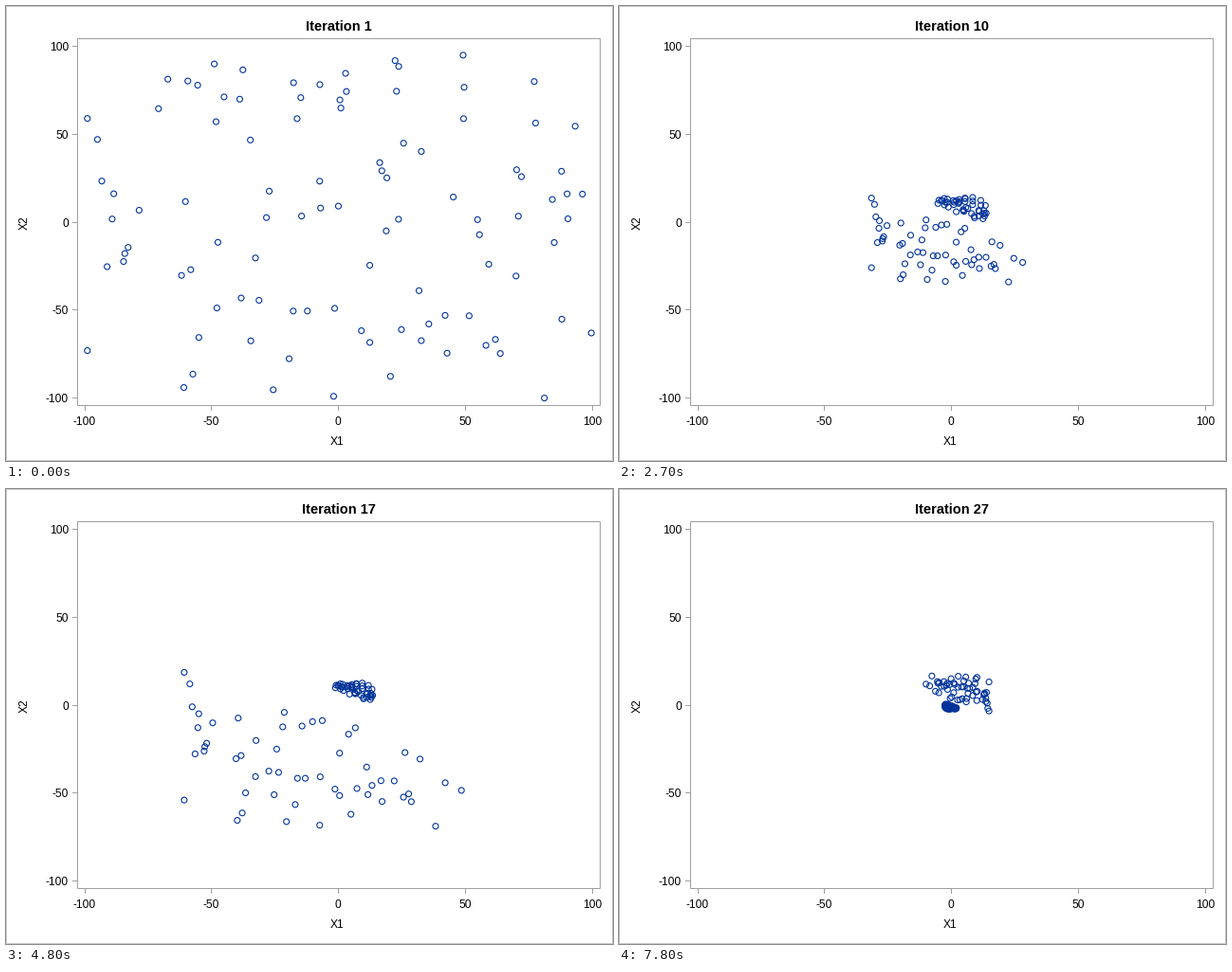
A matplotlib script that plays this animation: 640 px wide and 480 px high, repeating every 8 s.

```python
import numpy as np
import matplotlib.pyplot as plt
from matplotlib.animation import FuncAnimation
from matplotlib.patches import Rectangle

W, H, DPI = 640, 480, 100
STEP_MS, TICK_MS, LOOP_MS = 300, 100, 8000
BLUE, GREY, PALE = "#003399", "#a0a0a0", "#c8c8c8"

# Outermost particles; the others are scattered at random inside them.
RIM = np.array([(-99, 59), (-99, -73), (-61, -94), (-2, -99), (81, -100),
                (99.5, -63), (96, 16), (77, 80), (49, 95), (-49, 90)])
COUNT = 100

# Turning points of the swing: iteration -> scale of the swarm.
SWING = {1: 1, 4: -.572, 8: .42, 10: .3, 13: -.46, 15: -.317, 17: .55,
         19: -.821, 21: .55, 23: -.166, 25: .305, 27: -.125}
CLUMP = np.array([24.5, 39])


def scatter_swarm(seed=7):
    rng = np.random.default_rng(seed)
    inner = rng.uniform(-96, 94, (4 * COUNT, 2))
    inner = inner[np.abs(inner).sum(axis=1) < 150]
    return np.vstack([RIM, inner[:COUNT - len(RIM)]])


homes = scatter_swarm()
clumping = homes @ (.6, 1) > 16


def swing(iteration):
    """Scale of the swarm, eased between the turning points."""
    keys = list(SWING)
    i = min(np.searchsorted(keys, iteration, side="right"), len(keys) - 1)
    a, b = keys[i - 1], keys[i]
    ease = (1 - np.cos(np.pi * (iteration - a) / (b - a))) / 2
    return SWING[a] + (SWING[b] - SWING[a]) * ease


def glide(iteration, start, end, a, b):
    t = np.clip((iteration - start) / (end - start), 0, 1)
    return np.array(a) + (np.array(b) - a) * t


def swarm(iteration):
    """Particle positions: one side clumps while the whole swarm swings."""
    squeeze = np.interp(iteration, [7, 10, 15, 19], [1, .38, .1, .22])
    pos = homes.copy()
    pos[clumping] = CLUMP + squeeze * (pos[clumping] - CLUMP)
    focus = glide(iteration, 4, 15, (3.6, 3.2), (12.9, 26.5))
    origin = glide(iteration, 4, 10, (3.6, 3.2), (.7, .8))
    return origin + swing(iteration) * (pos - focus)


def to_pixels(xy):
    return np.array([350.3, 227.6]) + np.array([2.677, -1.855]) * xy


def pt(px):
    return px * 72 / DPI


plt.rcParams["font.family"] = "Liberation Sans"
fig = plt.figure(figsize=(W / DPI, H / DPI), dpi=DPI, facecolor="white")
ax = fig.add_axes([0, 0, 1, 1])
ax.set_xlim(-.5, W - .5)
ax.set_ylim(H - .5, -.5)
ax.axis("off")


def box(x0, y0, x1, y1, color):
    ax.add_patch(Rectangle((x0, y0), x1 - x0, y1 - y0, fill=False,
                           ec=color, lw=pt(1), snap=False))


def tick(xs, ys):
    ax.plot(xs, ys, color=GREY, lw=pt(1), snap=False, solid_capstyle="butt")


def label(x, y, text, size=12, **kw):
    style = dict(ha="center", va="center_baseline", color="black")
    return ax.text(x, y, text, fontsize=pt(size), **{**style, **kw})


box(0, 0, W - 1, H - 1, PALE)
box(75, 34, 626, 421, GREY)
for value in range(-100, 101, 50):
    x, y = np.round(to_pixels(np.array([value, value])))
    tick([x, x], [421.5, 426.5])
    tick([69.5, 74.5], [y, y])
    label(x - .5, 437, str(value))
    label(65.5, y, str(value), ha="right")
label(348.5, 458, "X1")
label(19.5, 228, "X2", rotation=90, va="center")
title = label(350.5, 20, "", 14.6, weight="bold")
dots = ax.scatter([], [], s=pt(6) ** 2, facecolors="none", edgecolors=BLUE,
                  linewidths=pt(1.1), zorder=3, snap=False)


def update(frame):
    iteration = frame * TICK_MS // STEP_MS + 1
    title.set_text(f"Iteration {iteration}")
    dots.set_offsets(to_pixels(swarm(iteration)))
    return title, dots


anim = FuncAnimation(fig, update, frames=LOOP_MS // TICK_MS,
                     interval=TICK_MS, repeat=True, repeat_delay=0)
plt.show()
```
